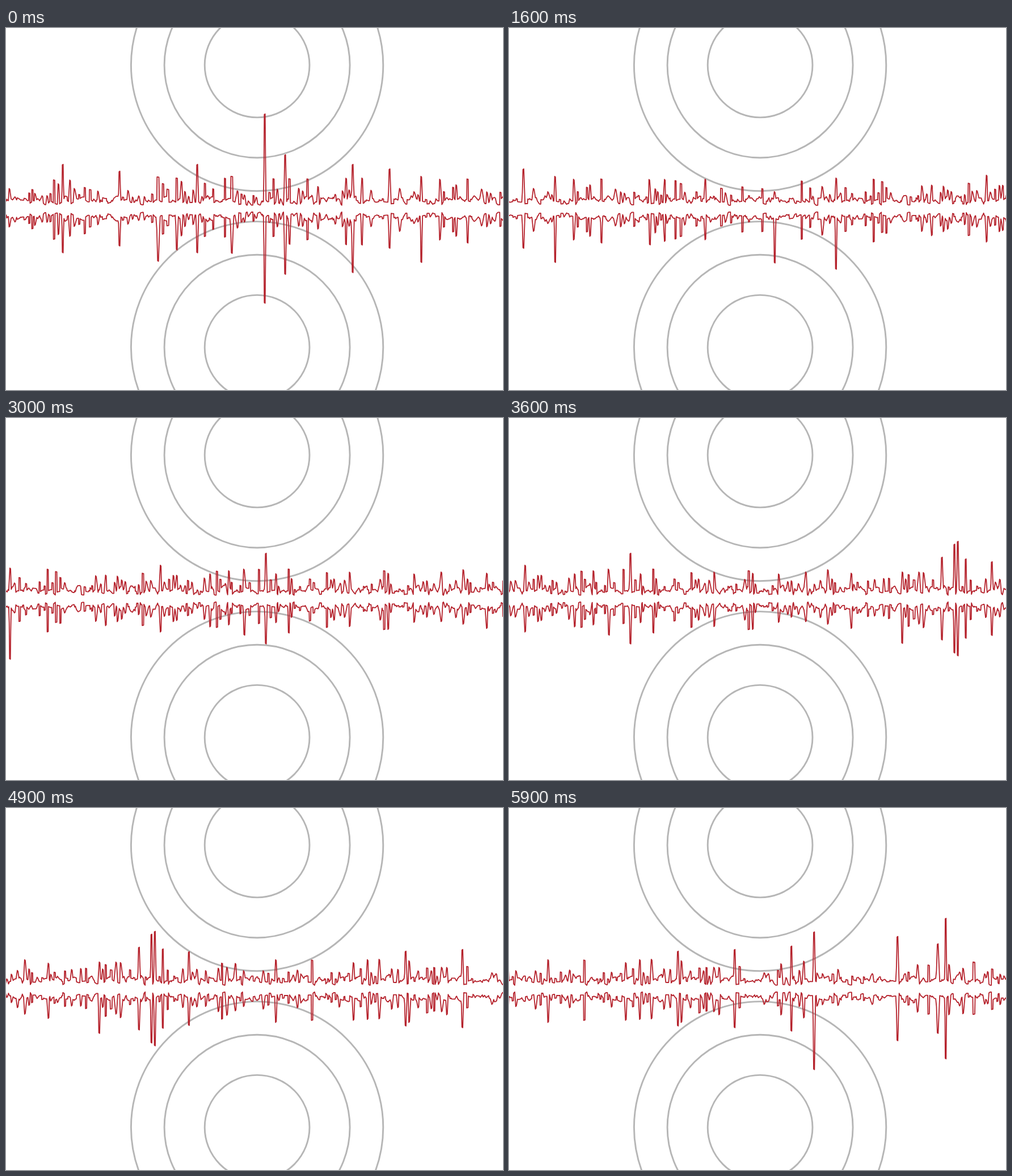
An HTML page that plays this animation: 876x639 px, repeating every 6000 ms.

```html
<!DOCTYPE html>
<html lang="en">
<head>
<meta charset="utf-8">
<title>Scrolling waveform</title>
<style>
  html, body { margin: 0; width: 100%; height: 100%; overflow: hidden; background: #fff; }
  svg { display: block; width: 876px; height: 639px; }
</style>
</head>
<body>
<svg viewBox="0 0 876 639">
  <g id="rings" fill="none" stroke="#b6b6b6" stroke-width="2.9"></g>
  <g id="wave" fill="none" stroke="#b5222c" stroke-width="1.8" stroke-linejoin="round"></g>
</svg>
<script>
const NS = 'http://www.w3.org/2000/svg';
const LOOP = 6000, STEP = 100, SHIFT = 122 / 3, AXIS = 318.8, END = 3300;

// Tallest peaks: position, height above the axis, depth below if it differs
const peaks = [
  [100, 78], [200, 66], [268, 56, 93], [301, 54, 73], [337, 78], [398, 57, 79],
  [456, 167], [492, 95, 116], [611, 78, 113], [676, 70], [732, 57, 95],
  [1119, 30, 96], [1227, 54, 107], [1492, 59], [1678, 80], [2157, 47, 79],
  [2227, 73], [2249, 96], [2255, 101], [2269, 70], [2315, 65], [2697, 66],
  [2797, 69], [2897, 75], [2937, 100, 143], [3084, 92], [3155, 79], [3169, 124]
];

function random(seed) {
  return () => {
    seed = seed + 0x6D2B79F5 | 0;
    let t = Math.imul(seed ^ seed >>> 15, 1 | seed);
    t = t + Math.imul(t ^ t >>> 7, 61 | t) ^ t;
    return ((t ^ t >>> 14) >>> 0) / 4294967296;
  };
}

const rnd = random(23);
const between = (a, b) => a + (b - a) * rnd();

function feature(x, up, down) {
  return {
    x, up, down,
    square: rnd() < 0.4,
    lean: between(-1, 1),
    width: between(2, 4),
    valley: between(7, 20),
    tail: between(-3, 5)
  };
}

// Low bumps with an occasional spike, filling the space up to the next peak
function filler(x) {
  const spike = rnd() < 0.2;
  const up = spike ? between(34, 54) : 13 + 23 * rnd() ** 1.6;
  return feature(x, up, up * between(0.85, spike ? 1.25 : 1.15));
}

function buildFeatures() {
  const list = [];
  let x = -12;
  for (const [next, up, down = up] of [...peaks, [END, 20]]) {
    for (x += between(6, 9); x < next - 5; x += between(5, 10)) list.push(filler(x));
    list.push(feature(next, up, down));
    x = next;
  }
  return list;
}

function trace(list, side, dir) {
  const pts = [];
  const add = (x, h) => pts.push(x.toFixed(1) + ' ' + (AXIS + dir * h).toFixed(1));
  let valley = 12;
  list.forEach((f, i) => {
    const before = i ? f.x - list[i - 1].x : 9;
    const after = i + 1 < list.length ? list[i + 1].x - f.x : 9;
    const h = f[side];
    const w = Math.min(f.width, before / 2.4, after / 2.4);
    if (h > 60) {
      add(f.x - w, valley);
      add(f.x - w * 0.6, h * 0.4);
      add(f.x - 0.7, h - 1);
      add(f.x + 0.7, h);
      add(f.x + w * 0.6, h * 0.55);
      add(f.x + w, f.valley);
    } else if (f.square) {
      add(f.x - w * 0.6, valley);
      add(f.x - w * 0.45, h);
      add(f.x + w * 0.4, h - 0.6);
      add(f.x + w * 0.6, f.valley);
    } else {
      const top = f.x + f.lean * w * 0.4;
      add(f.x - w, valley);
      add(top - 0.6, h);
      add(top + 0.6, h - 1.5);
      add(f.x + w, f.valley);
    }
    valley = Math.max(6, f.valley + f.tail);
    if (after > 6.5) add(f.x + after * 0.55, valley);
  });
  return 'M' + pts.join('L');
}

function make(parent, tag, attrs) {
  const el = document.createElementNS(NS, tag);
  for (const key in attrs) el.setAttribute(key, attrs[key]);
  parent.appendChild(el);
}

const rings = document.getElementById('rings');
const wave = document.getElementById('wave');

for (const cy of [65.5, 563.8])
  for (const r of [92.4, 163.5, 222.2])
    make(rings, 'circle', { cx: 442.6, cy, r });

const features = buildFeatures();
make(wave, 'path', { d: trace(features, 'up', -1) });
make(wave, 'path', { d: trace(features, 'down', 1) });

function draw() {
  const step = Math.floor(performance.now() % LOOP / STEP);
  wave.setAttribute('transform', `translate(${(-step * SHIFT).toFixed(2)} 0)`);
  requestAnimationFrame(draw);
}
draw();
</script>
</body>
</html>
```
